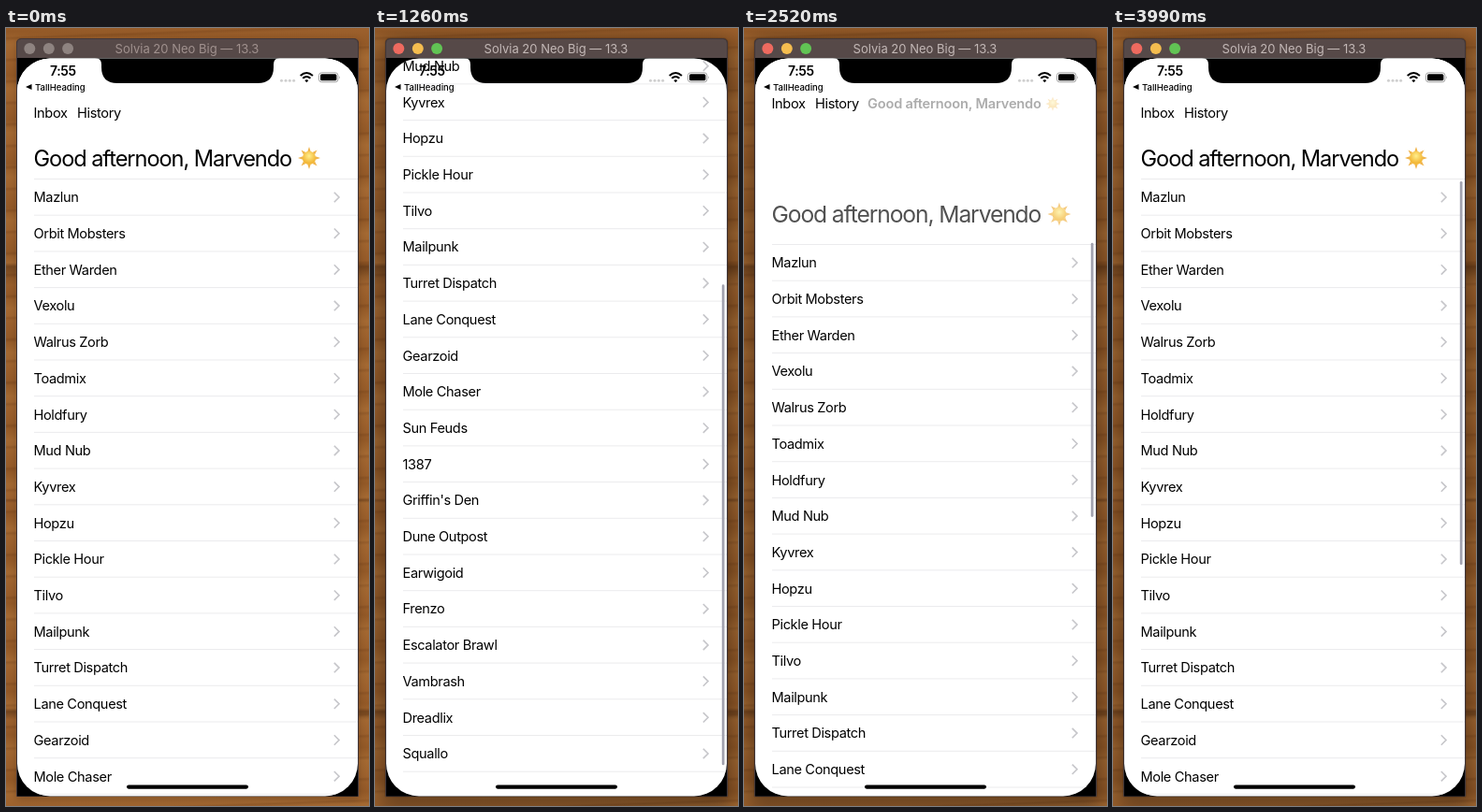
Write an HTML page that moves like this. It is 388 px wide and 832 px high and loops after 4060 ms.

```html
<!DOCTYPE html>
<html lang="en">
<head>
<meta charset="utf-8">
<style>
  html, body { margin: 0; width: 100%; height: 100%; overflow: hidden; }
  body {
    background:
      linear-gradient(transparent 251px, rgba(50,22,5,.4) 255px, transparent 275px 503px, rgba(50,22,5,.25) 505px,
        transparent 508px 727px, rgba(50,22,5,.4) 731px, transparent 740px),
      repeating-linear-gradient(178deg, transparent 0 9px, rgba(70,30,5,.16) 11px, transparent 14px 23px),
      repeating-linear-gradient(182deg, #9d612d 0, #935927 17px, #a46932 31px, #9d612d 47px);
  }
  #window {
    position: absolute; left: 11px; top: 11px; width: 366px; height: 811px;
    border-radius: 5px 5px 0 0; box-shadow: 0 3px 8px rgba(0,0,0,.2);
  }
  .active #window { box-shadow: 0 0 1px #000, 0 8px 22px 6px rgba(0,0,0,.36); }
  svg { position: absolute; left: 0; top: 0; }
  text { font: 14.6px Inter, "Open Sans", sans-serif; font-optical-sizing: none; letter-spacing: -.025em; }
  #large text { font-size: 23.6px; letter-spacing: -.045em; }
  #inline text, #clock { font-weight: 600; }
  #inline text { letter-spacing: -.012em; }
  #clock { font-size: 14px; }
  #back { font-size: 9.5px; font-weight: 500; letter-spacing: 0; }
  #name { font-size: 13px; letter-spacing: 0; text-anchor: middle; fill: #a0918e; }
  .active #name { fill: #c3b8b6; }
  #lights circle { fill: #8e8380; }
  .active #lights :nth-child(1) { fill: #ee6a5f; }
  .active #lights :nth-child(2) { fill: #f5bd4f; }
  .active #lights :nth-child(3) { fill: #61c454; }
  .rule { stroke: #ebebed; }
  .chevron { fill: none; stroke: #c6c6ca; stroke-width: 1.6; }
</style>
</head>
<body>
<div id="window"></div>
<svg width="388" height="832" viewBox="0 0 388 832">
  <defs>
    <clipPath id="screen"><rect x="12" y="32.5" width="364" height="789" rx="35"/></clipPath>
    <radialGradient id="glow" cy=".35"><stop stop-color="#ffee8c"/><stop offset="1" stop-color="#f3b93a"/></radialGradient>
    <g id="sun">
      <path id="rays" fill="#f0b44c"/>
      <circle r="7.2" fill="url(#glow)"/>
    </g>
  </defs>

  <path d="M11.5 821.5V16q0-4.5 5-4.5H371.5q5 0 5 4.5V821.5Z" fill="#211a1a" stroke="#40363a"/>
  <path d="M12 32V16q0-4 4-4H372q4 0 4 4V32Z" fill="#564948"/>
  <rect x="12" y="32" width="364" height="789.5"/>
  <g id="lights"><circle cx="25.3" cy="22" r="6"/><circle cx="45.8" cy="22" r="6"/><circle cx="66.1" cy="22" r="6"/></g>
  <text id="name" x="193.5" y="26.7">Solvia 20 Neo Big — 13.3</text>

  <g clip-path="url(#screen)">
    <rect x="12" y="32" width="364" height="790" fill="#fff"/>
    <g id="list"></g>
    <g id="bar">
      <rect id="backdrop" x="12" y="-140" width="364" fill="#fff"/>
      <text x="29.5" y="96.3">Inbox</text>
      <text x="76" y="96.3">History</text>
      <g id="inline">
        <text x="132" y="96.3">Good afternoon, Marvendo</text>
        <use href="#sun" transform="translate(330 91) scale(.64)"/>
      </g>
      <g id="large">
        <text x="29.5" y="147.5">Good afternoon, Marvendo</text>
        <use href="#sun" x="324" y="139"/>
      </g>
    </g>
    <rect id="thumb" x="370.8" width="2.7" rx="1.35" fill="#a2a2ae"/>
    <circle id="touch" r="17.5" fill="#d2d2d2" fill-opacity=".85" stroke="#a2a2a2"/>

    <path d="M95 32q7 0 7 7v3q0 17 17 17H269q17 0 17-17v-3q0-7 7-7Z"/>
    <text id="clock" x="47" y="51.3">7:55</text>
    <path d="M21 63l6.5-3v6Z"/>
    <text id="back" x="31" y="66.5">TallHeading</text>
    <g fill="#cfcfcf">
      <circle cx="294.5" cy="56.3" r="1.5"/><circle cx="299" cy="56.3" r="1.5"/>
      <circle cx="303.3" cy="56.3" r="1.5"/><circle cx="307.6" cy="56.3" r="1.5"/>
    </g>
    <g fill="none" stroke="#000" stroke-width="2">
      <path d="M314.7 51q6.6-6 13.2 0M317.2 53.8q4.1-3.6 8.2 0"/>
    </g>
    <path d="M319.3 56q2-1.6 4 0l-2 2.2Z"/>
    <rect x="334.5" y="47.8" width="20.4" height="10" rx="2.8" fill="none" stroke="#a3a3a3"/>
    <rect x="336" y="49.3" width="17.4" height="7" rx="1.5"/>
    <path d="M356.2 51.2q1.6 1.6 0 3.4Z" fill="#a3a3a3"/>
    <rect x="129" y="809.5" width="130" height="4.2" rx="2.1"/>
  </g>
</svg>
<script>
const LOOP = 4060, STEP = 70, PITCH = 38.7, BOTTOM = 415;
const games = `Mazlun,Orbit Mobsters,Ether Warden,Vexolu,Walrus Zorb,Toadmix,Holdfury,Mud Nub,Kyvrex,Hopzu,
Pickle Hour,Tilvo,Mailpunk,Turret Dispatch,Lane Conquest,Gearzoid,Mole Chaser,Sun Feuds,1387,Griffin's Den,
Dune Outpost,Earwigoid,Frenzo,Escalator Brawl,Vambrash,Dreadlix,Squallo`.split(/,\s*/);

const $ = id => document.getElementById(id);
const set = (id, attrs) => { for (const k in attrs) $(id).setAttribute(k, attrs[k]); };
const clamp = (x, lo = 0, hi = 1) => Math.min(hi, Math.max(lo, x));
const ease = x => (x = clamp(x), x * x * (3 - 2 * x));
const coast = (v, t) => v / 2 * (1 - Math.exp(-2 * t));
const bounce = (v, t) => v * t * Math.exp(-10 * t);

const rule = y => `<path class="rule" d="M30 ${y}H376"/>`;
$('list').innerHTML = rule(161.5) + games.map((name, i) => {
  const y = 181 + PITCH * i;
  return `<text x="29.5" y="${y + 5.3}">${name}</text>
    <path class="chevron" d="M350.8 ${y - 5.2}l5.2 5.2l-5.2 5.2"/>${rule(y + 19.2)}`;
}).join('');

const polar = (r, turn) => [r * Math.sin(turn * 2 * Math.PI), -r * Math.cos(turn * 2 * Math.PI)];
set('rays', { d: [0, 1, 2, 3, 4, 5, 6, 7].map(i =>
  `M${polar(7, i / 8 - .04)}L${polar(12, i / 8)}L${polar(7, i / 8 + .04)}Z`).join('') });

// Flick up, bounce at the bottom, flick down, bounce at the top; t in seconds
function scrollAt(t) {
  if (t < .758) return 0;
  if (t < .9) return 64 * ((t - .758) / .142) ** 3;
  if (t < 1.265) return 64 + coast(1353, t - .9);
  if (t < 2.1) return BOTTOM + bounce(652, t - 1.265);
  if (t < 2.355) return BOTTOM - 283 * ((t - 2.1) / .255) ** 2;
  if (t < 2.42) return 132 - coast(2167, t - 2.355);
  return -bounce(1903, t - 2.42);
}

function draw(t) {
  const s = scrollAt(t), pull = Math.max(0, -s);
  const returning = t > 1.5;
  document.body.className = t > .05 ? 'active' : '';
  set('list', { transform: `translate(0 ${-s})` });

  // Navigation bar slides away on the first swipe and returns on the second
  const hidden = ease((t - .84) / .2) - ease((t - 2.354) / .2);
  const collapse = returning ? Math.min(s, 51) : Math.min(s, 0);
  const fade = returning ? clamp((t - 2.384) / .2) : 1;
  set('bar', { transform: `translate(0 ${-129 * hidden})` });
  set('backdrop', { height: 301 - collapse + 7 * hidden });
  set('large', {
    transform: `translate(29.5 ${139 - collapse}) scale(${1 + .044 * pull / 70}) translate(-29.5 -139)`,
    opacity: fade
  });
  set('inline', { opacity: 1 - fade });
  // Once fully hidden, the bar lets the list run up under the status bar
  set('bar', { visibility: hidden < 1 ? 'visible' : 'hidden' });

  const barShown = t < .84 || t >= 2.354;
  const top = barShown ? 164 + .4 * Math.max(0, s) + .94 * pull : 107.4 + .406 * Math.min(s, BOTTOM) + Math.max(0, s - BOTTOM);
  const end = barShown ? 574 + .4 * Math.max(0, s) - .73 * pull : 621.4 + .406 * Math.min(s, BOTTOM);
  set('thumb', { y: top, height: end - top, opacity: t < .758 ? 0 : 1 });

  const first = t >= .63 && t < .9, second = t >= 2.02 && t < 2.355;
  set('touch', {
    cx: first ? 205 : 211,
    cy: (first ? 560 : 501 + BOTTOM) - s,
    opacity: first || second ? 1 : 0
  });
}

const start = performance.now();
function tick() {
  const ms = (performance.now() - start) % LOOP;
  draw(Math.floor(ms / STEP) * STEP / 1000);
  requestAnimationFrame(tick);
}
tick();
</script>
</body>
</html>
```
